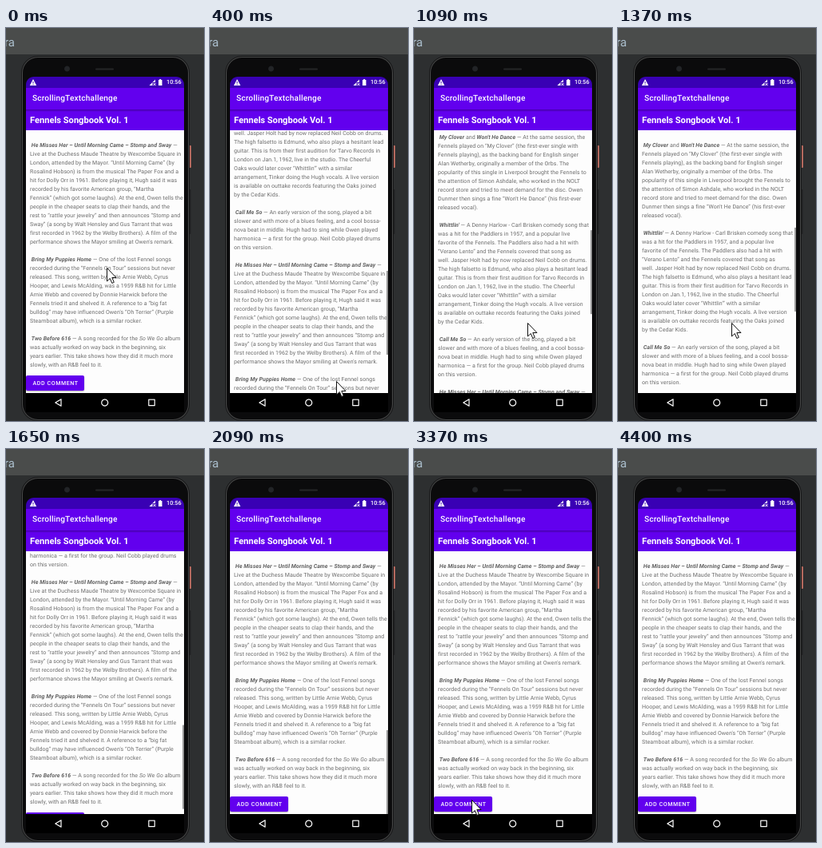
An HTML page with a canvas for the animation above (4.79 s loop, 248x492 px).

```html
<!DOCTYPE html>
<html lang="en">
<head>
<meta charset="utf-8">
<title>Scrolling text</title>
<style>
html, body { margin: 0; width: 100%; height: 100%; overflow: hidden; background: #2d2f30; }
body { position: relative; font-family: Roboto, Arial, sans-serif; text-rendering: geometricPrecision; }
body div, canvas, svg { position: absolute; white-space: pre; }
#band { left: 0; top: 0; width: 100%; height: 33px; background: #4a4c4b; }
#tab { left: -2px; top: 8px; font-size: 15px; line-height: 20px; color: #abbfcd; }
#shell { left: 0; top: 0; width: 248px; height: 492px; }
#status { left: 25px; top: 61px; width: 198px; height: 14px; border-radius: 10px 10px 0 0; overflow: hidden; }
#clock { left: 176px; top: 2px; font: 500 7.3px/10px Roboto, sans-serif; color: #fff; }
#app { left: 33px; top: 82px; font: 500 10.1px/14px Roboto, sans-serif; letter-spacing: .17px; color: #fff; }
#heading { left: 30px; top: 109px; font: 700 11.1px/14px Roboto, sans-serif; color: #fff; }
#view { left: 25px; top: 128px; width: 198px; height: 329px; overflow: hidden; background: #fdfdfd; }
#page { left: 0; top: 0; width: 100%; height: 100%; }
#article { left: 5px; top: -305px; font-size: 7px; line-height: 11px; letter-spacing: .07px; color: #6c6c6c; }
#article b { font-style: italic; color: #606060; }
#button { left: 0; top: 307px; width: 73px; height: 19px; border-radius: 2px; overflow: hidden;
  background: #6200ee; box-shadow: 0 1px 1.5px rgba(0, 0, 0, .3); }
#ripple { left: 0; top: 0; width: 100%; height: 100%; background: #fff; }
#label { left: 8.5px; top: 0; font: 500 7.05px/19px Roboto, sans-serif; letter-spacing: .6px; color: #fff; }
#thumb { right: 0; bottom: 0; width: 2px; height: 105px; background: #9a9a9a; }
#cursor { left: 0; top: 0; overflow: visible; }
</style>
</head>
<body>
<div id="band"></div>
<div id="tab">ra</div>
<canvas id="shell"></canvas>
<div id="status"><div id="clock">10:56</div></div>
<div id="app">ScrollingTextchallenge</div>
<div id="heading">Fennels Songbook Vol. 1</div>
<div id="view">
  <div id="page">
    <div id="article"></div>
    <div id="button"><div id="ripple"></div><div id="label">ADD COMMENT</div></div>
  </div>
  <div id="thumb"></div>
</div>
<svg id="cursor" width="13" height="21">
  <path d="M.5 .5V17L4.3 13.5L6.8 19.5L9.3 18.4L6.8 12.5H12Z" fill="#fff" stroke="#111"/>
</svg>

<script>
const LOOP = 4790, STEP = 138, LEAD = 25;
const $ = id => document.getElementById(id);

// *bold italic* and _italic_
const ARTICLE = ` *My Clover* and *Won't He Dance* — At the same session, the
Fennels played on “My Clover” (the first-ever single with
Fennels playing), as the backing band for English singer
Alan Wetherby, originally a member of the Orbs. The
popularity of this single in Liverpool brought the Fennels to
the attention of Simon Ashdale, who worked in the NOLT
record store and tried to meet demand for the disc. Owen
Dunmer then sings a fine “Won't He Dance” (his first-ever
released vocal).

 *Whittlin'* — A Denny Harlow - Carl Brisken comedy song that
was a hit for the Paddlers in 1957, and a popular live
favorite of the Fennels. The Paddlers also had a hit with
“Verano Lento” and the Fennels covered that song as
well. Jasper Holt had by now replaced Neil Cobb on drums.
The high falsetto is Edmund, who also plays a hesitant lead
guitar. This is from their first audition for Tarvo Records in
London on Jan.1, 1962, live in the studio. The Cheerful
Oaks would later cover “Whittlin'” with a similar
arrangement, Tinker doing the Hugh vocals. A live version
is available on outtake records featuring the Oaks joined
by the Cedar Kids.

 *Call Me So* — An early version of the song, played a bit
slower and with more of a blues feeling, and a cool bossa-
nova beat in middle. Hugh had to sing while Owen played
harmonica — a first for the group. Neil Cobb played drums
on this version.

 *He Misses Her – Until Morning Came – Stomp and Sway* —
Live at the Duchess Maude Theatre by Wexcombe Square in
London, attended by the Mayor. “Until Morning Came” (by
Rosalind Hobson) is from the musical The Paper Fox and a
hit for Dolly Orr in 1961. Before playing it, Hugh said it was
recorded by his favorite American group, “Martha
Fennick” (which got some laughs). At the end, Owen tells the
people in the cheaper seats to clap their hands, and the
rest to “rattle your jewelry” and then announces “Stomp and
Sway” (a song by Walt Hensley and Gus Tarrant that was
first recorded in 1962 by the Welby Brothers). A film of the
performance shows the Mayor smiling at Owen's remark.

 *Bring My Puppies Home* — One of the lost Fennel songs
recorded during the “Fennels On Tour” sessions but never
released. This song, written by Little Arnie Webb, Cyrus
Hooper, and Lewis McAlding, was a 1959 R&B hit for Little
Arnie Webb and covered by Donnie Harwick before the
Fennels tried it and shelved it. A reference to a “big fat
bulldog” may have influenced Owen's “Oh Terrier” (Purple
Steamboat album), which is a similar rocker.

 *Two Before 616* — A song recorded for the _So We Go_ album
was actually worked on way back in the beginning, six
years earlier. This take shows how they did it much more
slowly, with an R&B feel to it.`;

$('article').innerHTML = ARTICLE.replace(/&/g, '&amp;')
  .replace(/\*(.+?)\*/g, '<b>$1</b>')
  .replace(/_(.+?)_/g, '<i>$1</i>');

function drawShell() {
  const scale = 2, canvas = $('shell');
  canvas.width = 248 * scale;
  canvas.height = 492 * scale;
  const g = canvas.getContext('2d');
  g.scale(scale, scale);

  const round = (x, y, w, h, r, color) => {
    g.beginPath();
    g.roundRect(x, y, w, h, r);
    g.fillStyle = color;
    g.fill();
  };
  const rect = (x, y, w, h, color) => round(x, y, w, h, 0, color);
  const shape = d => new Path2D(d);

  // body, side keys, camera, speaker
  round(229, 147, 3, 28, 1, '#b5695e');
  round(229, 202, 2.5, 56, 1, '#202122');
  ['#161617', '#484949', '#0b0b0c'].forEach((color, i) =>
    round(19 + i, 35 + i, 211 - 2 * i, 457 - 2 * i, 21 - i, color));
  round(73, 47.5, 7, 7, 3.5, '#222427');
  round(112, 50.5, 23, 2, 1, '#252627');

  // status bar, app bar, heading
  round(25, 61, 198, 14, [10, 10, 0, 0], '#3900b4');
  rect(25, 75, 198, 53, '#6200ee');
  const shade = g.createLinearGradient(0, 102, 0, 105);
  shade.addColorStop(0, 'rgba(0,0,0,.3)');
  shade.addColorStop(1, 'rgba(0,0,0,0)');
  rect(25, 102, 198, 3, shade);

  // warning, signal, battery
  g.fillStyle = g.strokeStyle = '#fff';
  g.fill(shape('M34 64L38.2 72H29.8ZM33.5 67V69.4H34.5V67ZM33.5 70.2V71.2H34.5V70.2Z'), 'evenodd');
  g.fill(shape('M187 64.5V68H183.5ZM183.5 68V72H179.5Z'));
  g.fill(shape('M191 65H192.2V64H194.2V65H195.5V72H191Z'));
  g.lineWidth = .8;
  g.stroke(shape('M184.5 69L187.5 72M187.5 69L184.5 72'));

  // navigation bar
  rect(25, 457, 198, 24, '#000');
  g.lineWidth = 1.2;
  g.lineJoin = 'round';
  g.stroke(shape('M69 464.8V473.2L61.8 469Z'));
  g.stroke(shape('M119.7 469a4 4 0 1 1 8 0a4 4 0 1 1 -8 0'));
  g.stroke(shape('M178.8 465.2h7.4v7.4h-7.4Z'));
}

// 0 before a, 1 after b, slowing down in between
function glide(t, a, b) {
  const p = Math.min(1, Math.max(0, (t - a) / (b - a)));
  return 1 - (1 - p) ** 2;
}

// pointer moves: start, end, x, y
const MOVES = [
  [0, 250, 158, 442],
  [390, 520, 138, 235],
  [560, 1000, 142, 369],
  [1360, 1640, 166, -30],
  [2090, 2590, 101, 436],
  [2600, 3200, 72, 439],
  [3700, 3960, 101, 459]
];

function pointer(t) {
  let x = 126, y = 300;
  for (const [a, b, toX, toY] of MOVES) {
    const p = glide(t, a, b);
    x += (toX - x) * p;
    y += (toY - y) * p;
  }
  return [x, y].map(Math.round);
}

// two flings down, one back to the end of the text
const scrollAt = t => Math.round(
  150 * glide(t, 0, 400) + 169 * glide(t, 560, 1250) - 319 * glide(t, 1370, 1718));

const move = (id, x, y) => $(id).style.transform = `translate(${x}px, ${y}px)`;

function render(now) {
  const step = Math.floor((now % LOOP + LEAD) / STEP);
  const t = Math.max(0, step * STEP - LEAD);
  const scroll = scrollAt(t);
  move('page', 0, scroll);
  move('thumb', 0, -scroll * .32);
  move('cursor', ...pointer(t));
  $('thumb').style.opacity = glide(t, 0, 110) - glide(t, 2500, 2850);
  $('ripple').style.opacity = .2 * (glide(t, 3680, 3800) - glide(t, 4050, 4350));
  $('cursor').style.visibility = t < 4350 ? 'visible' : 'hidden';
}

drawShell();
const start = performance.now();
function loop() {
  render(performance.now() - start);
  requestAnimationFrame(loop);
}
loop();
</script>
</body>
</html>
```
